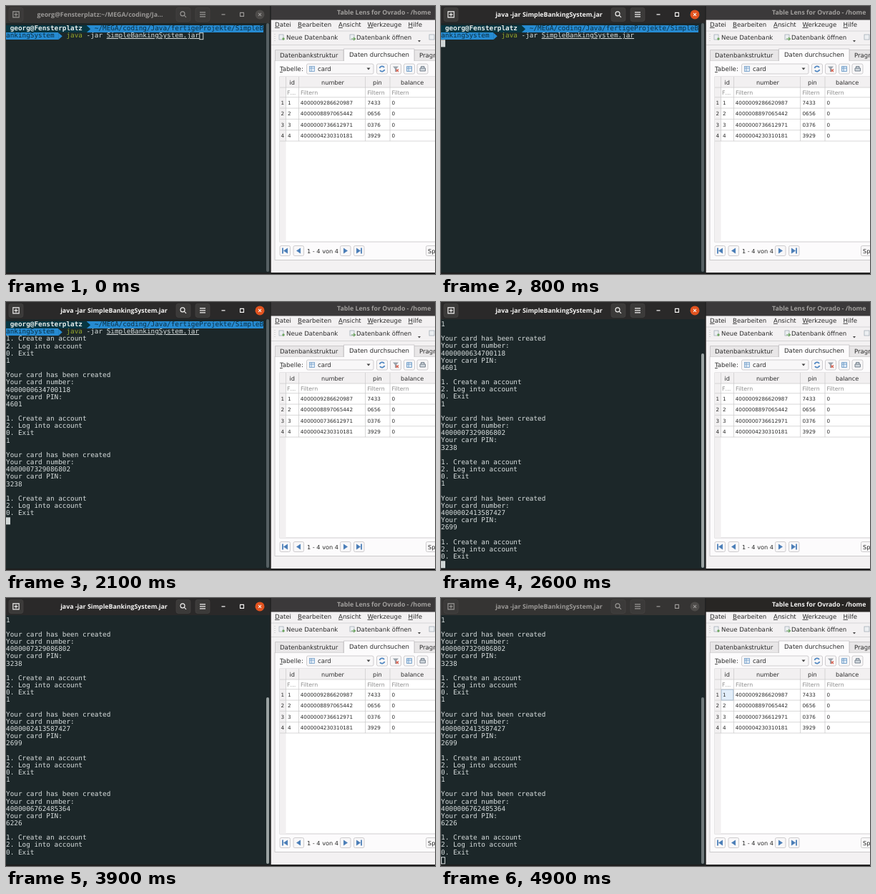
An HTML page for the animation above (5000 ms loop, 600 px wide and 375 px high).

```html
<!DOCTYPE html>
<html lang="de">
<head>
<meta charset="utf-8">
<title>Terminal und Tabelle</title>
<style>
:root { --row: 10.16px; --cell: 5.63px; --bg: #1c2729; --blue: #268bd2; --navy: #073642; }
html, body { margin: 0; width: 100%; height: 100%; overflow: hidden; background: #222; }
#stage { position: relative; width: 600px; height: 375px; overflow: hidden; text-rendering: geometricPrecision; }
svg { position: absolute; left: 0; top: 0; }
svg text { font: 8.6px "DejaVu Sans", sans-serif; fill: #2b2b2b; white-space: pre; }
svg .title { font: bold 8.8px "Open Sans", "Noto Sans", sans-serif; }
.mnemonic { text-decoration: underline; }

/* database window */
.bar { fill: #3b393a; animation: bar 5s linear infinite; }
svg .name { fill: #a19f9d; animation: name 5s linear infinite; }
.box { fill: #f8f7f8; stroke: #c3c1c3; stroke-width: .8; }
.line { stroke: #cfcdcf; stroke-width: .8; fill: none; }
svg .head text, svg .small { font-size: 8.2px; }
svg .hint { font-size: 7.8px; fill: #8b8b8b; }
svg .cells text { font-size: 7.2px; }
.pick { fill: #e2eefa; stroke: #86a9c8; stroke-width: .8; animation: pick 5s step-end infinite; }

/* terminal window */
.top { fill: #353433; animation: top 5s linear infinite; }
.key { fill: #3b3a39; stroke: #4a4847; stroke-width: .6; }
.ink { color: #9a9896; animation: ink 5s linear infinite; }
svg .ink text { fill: currentColor; }
.ink path, .ink .ring { fill: none; stroke: currentColor; stroke-width: 1.1; }
.close { fill: #4d4b49; animation: close 5s linear infinite; }
.idle { animation: idle 5s step-end infinite; }
.busy { animation: busy 5s step-end infinite; }
#term { position: absolute; left: 0; top: 24px; width: 369px; height: 349px; overflow: hidden; background: var(--bg); }
#page { position: absolute; left: 0; top: 3.1px; width: 362px; animation: scroll 5s step-end infinite; }
pre { margin: 0; overflow: hidden; color: #d8dede; font: 9.35px/var(--row) "DejaVu Sans Mono", monospace; animation: print 5s step-end infinite; }
pre span { display: inline-block; height: var(--row); vertical-align: top; }
.user { background: var(--navy); color: #e8ecea; font-weight: bold; }
.path { background: var(--blue); color: #0b2f42; }
.tip { width: 1ch; background: var(--from); clip-path: polygon(0 0, 100% 50%, 0 100%); }
.over { background: var(--blue); }
.cmd { color: #93a62c; }
#cursor { position: absolute; left: 0; top: 0; box-sizing: border-box; width: var(--cell); height: var(--row); border: 1px solid #d0d6d6; animation: move 5s step-end infinite, look 5s step-end infinite; }
#thumb { position: absolute; right: 1px; width: 4.5px; bottom: 1px; border-radius: 2px; animation: thumb 5s step-end infinite; }

@keyframes bar { 0%, 91% { fill: #3b393a } 98%, 100% { fill: #282624 } }
@keyframes name { 0%, 83% { fill: #a19f9d } 86%, 100% { fill: #f4f3f2 } }
@keyframes pick { 0% { opacity: 0 } 84%, 100% { opacity: 1 } }
@keyframes top { 0%, 1% { fill: #353433 } 10%, 91% { fill: #2a2929 } 98%, 100% { fill: #353433 } }
@keyframes ink { 0%, 1% { color: #9a9896 } 10%, 83% { color: #f5f4f3 } 86%, 100% { color: #9a9896 } }
@keyframes close { 0%, 1% { fill: #4d4b49 } 10%, 91% { fill: #e2531f } 98%, 100% { fill: #4d4b49 } }
@keyframes idle { 0% { opacity: 1 } 14%, 100% { opacity: 0 } }
@keyframes busy { 0% { opacity: 0 } 14%, 100% { opacity: 1 } }
@keyframes print {
  0% { height: calc(var(--row) * 2) }
  18% { height: calc(var(--row) * 5) }
  24% { height: calc(var(--row) * 6) }
  26% { height: calc(var(--row) * 16) }
  40% { height: calc(var(--row) * 17) }
  42% { height: calc(var(--row) * 27) }
  50% { height: calc(var(--row) * 28) }
  52% { height: calc(var(--row) * 38) }
  58% { height: calc(var(--row) * 39) }
  60%, 100% { height: calc(var(--row) * 49) }
}
@keyframes move {
  0% { transform: translate(calc(var(--cell) * 48), var(--row)) }
  14% { transform: translate(0, calc(var(--row) * 2)) }
  18% { transform: translate(0, calc(var(--row) * 5)) }
  24% { transform: translate(var(--cell), calc(var(--row) * 5)) }
  26% { transform: translate(0, calc(var(--row) * 16)) }
  40% { transform: translate(var(--cell), calc(var(--row) * 16)) }
  42% { transform: translate(0, calc(var(--row) * 27)) }
  50% { transform: translate(var(--cell), calc(var(--row) * 27)) }
  52% { transform: translate(0, calc(var(--row) * 38)) }
  58% { transform: translate(var(--cell), calc(var(--row) * 38)) }
  60%, 100% { transform: translate(0, calc(var(--row) * 49)) }
}
@keyframes look {
  0% { background: transparent; opacity: 1 }
  2% { background: #d0d6d6; opacity: 1 }
  72% { background: #d0d6d6; opacity: 0 }
  84%, 100% { background: transparent; opacity: 1 }
}
@keyframes scroll {
  0% { transform: none }
  52% { transform: translateY(calc(var(--row) * -5)) }
  60%, 100% { transform: translateY(calc(var(--row) * -16)) }
}
@keyframes thumb {
  0% { top: 0; background: #566063 }
  52% { top: 48px; background: #9aa2a2 }
  60% { top: 114.5px; background: #9aa2a2 }
  84%, 100% { top: 114.5px; background: #6f787a }
}
</style>
</head>
<body>
<div id="stage">
<svg width="600" height="375" viewBox="0 0 600 375">
  <defs>
    <path id="arrow" d="M3-4V4L-3 0Z" fill="#4c7fb8"/>
    <g id="end"><path d="M4-4V4L-2 0Z" fill="#4c7fb8"/><path d="M-3-4V4" stroke="#4c7fb8" stroke-width="1.8"/></g>
  </defs>

  <rect x="370" width="230" height="373" fill="#f3f1f2"/>
  <rect class="bar" x="370" width="230" height="19.5"/>
  <text class="title name" x="463" y="12.4">Table Lens for Ovrado - /home</text>

  <g>
    <g transform="translate(0 28.9)">
      <text x="376"><tspan class="mnemonic">D</tspan>atei</text>
      <text x="408"><tspan class="mnemonic">B</tspan>earbeiten</text>
      <text x="465"><tspan class="mnemonic">A</tspan>nsicht</text>
      <text x="505.5"><tspan class="mnemonic">W</tspan>erkzeuge</text>
      <text x="562.5"><tspan class="mnemonic">H</tspan>ilfe</text>
    </g>
    <path class="line" d="M371 35H600M371 54.5H600"/>
    <path d="M376 39V50" stroke="#bbb" stroke-dasharray="1 2"/>
    <g fill="#eceff2" stroke="#9aa5b0" stroke-width=".7">
      <rect x="382" y="40" width="6" height="7"/>
      <rect x="481" y="40" width="6" height="7"/>
      <rect x="592" y="40" width="7" height="7"/>
    </g>
    <circle cx="388" cy="46" r="1.7" fill="#6aa35c"/>
    <path d="M483 46H488M486 44L488.5 46L486 48" fill="none" stroke="#6aa35c" stroke-width="1.2"/>
    <text x="392" y="46.5">Neue Datenbank</text>
    <text x="490" y="46.5">Datenbank öffnen</text>
    <path d="M576 48H580L578 50.5Z" fill="#444"/>
  </g>

  <g>
    <rect x="376" y="76.5" width="230" height="279" fill="#fcfbfc" stroke="#c3c1c3" stroke-width=".8"/>
    <path d="M376.5 76.5V61.5H472V76.5M571 76.5V61.5H605V76.5" fill="#e8e6e7" stroke="#c3c1c3" stroke-width=".8"/>
    <path d="M472.5 77V60H571V77" fill="#fcfbfc" stroke="#c3c1c3" stroke-width=".8"/>
    <text x="383" y="71.5">Datenbankstruktur</text>
    <text x="480" y="71">Daten durchsuchen</text>
    <text x="578" y="71.5">Pragmas</text>
    <text x="383" y="91"><tspan class="mnemonic">T</tspan>abelle:</text>
    <rect class="box" x="420.5" y="81" width="93.5" height="14" rx="2"/>
    <rect x="424.5" y="84.5" width="7" height="7" fill="#e2ecf6" stroke="#6f9cc8" stroke-width=".8"/>
    <path d="M424.5 87H431.5M427 84.5V91.5" stroke="#6f9cc8" stroke-width=".8"/>
    <text x="436" y="91">card</text>
    <path d="M504.5 86.5H509.5L507 89.5Z" fill="#444"/>
    <rect class="box" x="518.5" y="81" width="15" height="14" rx="2"/>
    <rect class="box" x="537.5" y="81" width="15" height="14" rx="2"/>
    <rect class="box" x="556.5" y="81" width="15" height="14" rx="2"/>
    <rect class="box" x="575" y="81" width="15" height="14" rx="2"/>
    <path d="M522.5 87A3.6 3.6 0 0 1 529 86M529.5 89A3.6 3.6 0 0 1 523 90" fill="none" stroke="#4c84c0" stroke-width="1.8"/>
    <path d="M541 84.5H549L546 88V92H544V88Z" fill="#9aa3ab"/>
    <path d="M545.5 88.5L549 92M549 88.5L545.5 92" stroke="#d8604f" stroke-width="1.3"/>
    <path d="M560.5 84.5H567.5V91.5H560.5ZM560.5 87H567.5M563 84.5V91.5" fill="#dfeaf5" stroke="#6f9cc8" stroke-width=".9"/>
    <path d="M579 87H586.5V91H579ZM580.5 87V84.5H585V87" fill="#cfd6dc" stroke="#6b7884" stroke-width=".9"/>
  </g>

  <g>
    <rect x="383" y="99" width="220" height="231" fill="#fff" stroke="#c3c1c3" stroke-width=".8"/>
    <path d="M383 99H600V114H383ZM383 114H391.5V330H383Z" fill="#f2f0f1"/>
    <rect class="pick" x="392" y="128" width="17" height="15"/>
    <path class="line" d="M383 114H600M383 127.7H600M383 143H600M383 158.3H600M383 173.7H600M383 189H600M391.5 99V189M409.5 99V189M502.5 99V189M537 99V189"/>
    <g class="head" transform="translate(0 109.7)">
      <text x="396.5">id</text><text x="441">number</text>
      <text x="513">pin</text><text x="552">balance</text>
    </g>
    <text class="hint" x="393" y="124">F…</text><text class="hint" x="412" y="124">Filtern</text>
    <text class="hint" x="505.5" y="124">Filtern</text><text class="hint" x="539.5" y="124">Filtern</text>
    <g class="cells" id="cells"></g>
  </g>

  <g>
    <rect class="box" x="383" y="335.5" width="14.5" height="14" rx="2"/>
    <rect class="box" x="402" y="335.5" width="14.5" height="14" rx="2"/>
    <rect class="box" x="467.5" y="335.5" width="14.5" height="14" rx="2"/>
    <rect class="box" x="486.5" y="335.5" width="14.5" height="14" rx="2"/>
    <rect class="box" x="587.5" y="335.5" width="30" height="14" rx="2"/>
    <use href="#end" x="390" y="342.5"/>
    <use href="#arrow" x="409" y="342.5"/>
    <use href="#arrow" transform="translate(475 342.5) scale(-1 1)"/>
    <use href="#end" transform="translate(494 342.5) scale(-1 1)"/>
    <text class="small" x="421" y="345.5">1 - 4 von 4</text>
    <text class="small" x="590" y="345.5">Springe</text>
  </g>

  <rect y="373" width="600" height="2" fill="#1e1e1e"/>
  <rect x="368.5" width="2.2" height="375" fill="#222"/>
  <rect class="top" width="369" height="25"/>
  <g transform="translate(0 -.6)">
    <rect class="key" x="4" y="3" width="20" height="19" rx="3"/>
    <rect class="key" x="238" y="3" width="20" height="19" rx="3"/>
    <rect class="key" x="265" y="3" width="20" height="19" rx="3"/>
    <circle class="close" cx="355" cy="12.5" r="6.5"/>
    <g class="ink">
      <path d="M9.8 8.5H18.2V16.5H9.8ZM14 10V15M11.5 12.5H16.5"/>
      <circle class="ring" cx="247" cy="11.5" r="3"/>
      <path d="M249.5 14L252 16.5M271 9.5H279M271 12.5H279M271 15.5H279"/>
      <path d="M301.5 12.5H306.5M327.5 10H332.5V15H327.5ZM353 10.5L357 14.5M357 10.5L353 14.5"/>
      <text class="title idle" x="131.5" y="15.5" text-anchor="middle">georg@Fensterplatz:~/MEGA/coding/Ja...</text>
      <text class="title busy" x="151" y="15.5" text-anchor="middle">java -jar SimpleBankingSystem.jar</text>
    </g>
  </g>
</svg>

<div id="term">
  <div id="page">
    <pre id="out"><span class="user"> georg@Fensterplatz </span><span class="over"><span class="tip" style="--from:var(--navy)"></span></span><span class="path"> ~/MEGA/coding/Java/fertigeProjekte/SimpleB</span>
<span class="path">ankingSystem </span><span class="tip" style="--from:var(--blue)"></span> <span class="cmd">java</span> -jar <u>SimpleBankingSystem.jar</u>
</pre>
    <div id="cursor"></div>
  </div>
  <div id="thumb"></div>
</div>
</div>

<script>
const menu = "1. Create an account\n2. Log into account\n0. Exit\n";
const cards = [["4000000634700118", "4601"], ["4000007329086802", "3238"],
               ["4000002413587427", "2699"], ["4000006762485364", "6226"]];
const created = ([number, pin]) =>
  `1\n\nYour card has been created\nYour card number:\n${number}\nYour card PIN:\n${pin}\n\n${menu}`;
document.getElementById("out").append(menu + cards.map(created).join(""));

const rows = [["4000009286620987", "7433"], ["4000008897065442", "0656"],
              ["4000000736612971", "0376"], ["4000004230310181", "3929"]];
const columns = [384.5, 394, 411.8, 505.5, 539.5];
document.getElementById("cells").innerHTML = rows.map(([number, pin], i) =>
  [i + 1, i + 1, number, pin, 0].map((value, c) =>
    `<text x="${columns[c]}" y="${138 + i * 15.35}">${value}</text>`).join("")).join("");
</script>
</body>
</html>
```
